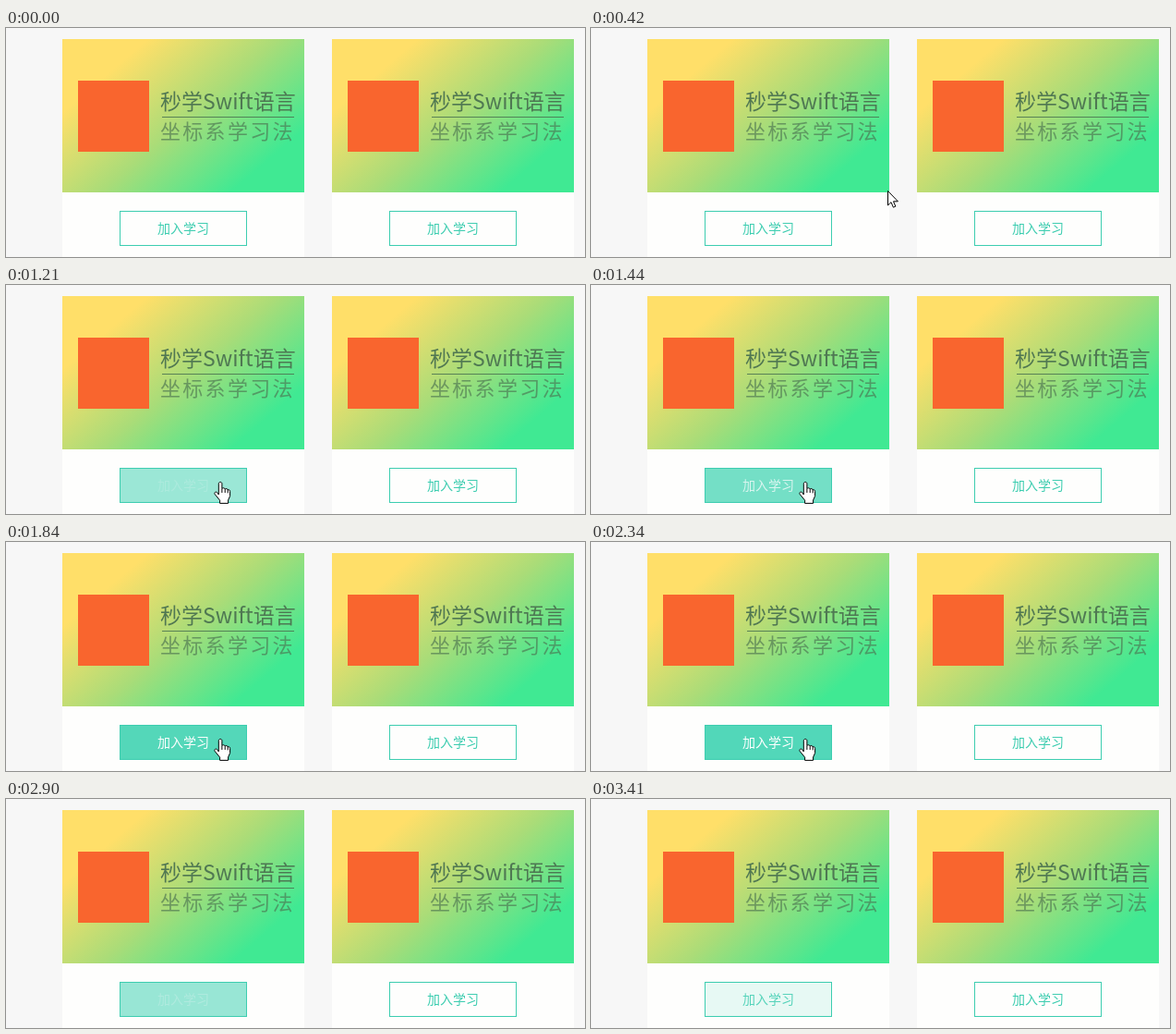
An HTML page for the animation above (3.61 s loop, 627 by 248 pixels).

```html
<!DOCTYPE html>
<html lang="zh-CN">
<head>
<meta charset="utf-8">
<title>加入学习</title>
<style>
  html, body { margin: 0; width: 100%; height: 100%; overflow: hidden; background: #f7f7f7; }
  svg { display: block; width: 627px; height: 248px; }
  text { font-family: "Noto Sans CJK SC", "Noto Sans CJK", "Noto Sans CJK JP", sans-serif; }
  .title { font-size: 23px; fill: #4b7250; fill-opacity: .95; }
  .sub { font-size: 22px; font-weight: 300; letter-spacing: 2.3px; fill: #4b7250; fill-opacity: .65; }
  .label { font-size: 14px; text-anchor: middle; fill: #3dcdb0; }
  .frame { fill: none; stroke: #3dcdb0; }
  .cursor { fill: #fff; stroke: #000; stroke-linejoin: round; }
</style>
</head>
<body>
<svg viewBox="0 0 627 248">
  <defs>
    <linearGradient id="sky" gradientUnits="userSpaceOnUse" x1="100" y1="58" x2="220" y2="198">
      <stop offset="0" stop-color="#ffdf69"/>
      <stop offset=".5" stop-color="#aadc78"/>
      <stop offset="1" stop-color="#40e993"/>
    </linearGradient>
    <g id="card">
      <rect x="61" y="12" width="262" height="236" fill="#fefefd"/>
      <rect x="61" y="12" width="262" height="166" fill="url(#sky)"/>
      <rect x="78" y="57" width="77" height="77" fill="#f9652e"/>
      <text class="title" x="167" y="88">秒学Swift语言</text>
      <path d="M169 96.5H312" stroke="#4b7250" stroke-opacity=".85"/>
      <text class="sub" x="167" y="120">坐标系学习法</text>
      <rect class="frame" x="123.5" y="198.5" width="137" height="37"/>
    </g>
  </defs>
  <use href="#card"/>
  <use href="#card" x="292"/>
  <rect id="fill" x="124" y="199" width="136" height="36" fill="#52d7b9" opacity="0"/>
  <text id="label" class="label" x="192" y="222">加入学习</text>
  <text class="label" x="484" y="222">加入学习</text>
  <g id="cursor" class="cursor" visibility="hidden">
    <path id="arrow" d="M.5 .5V16L4 12.7L6.4 18.2L8.8 17.2L6.5 11.8H11.4Z"/>
    <g id="hand" transform="translate(-7 -1)">
      <path d="M5.3 15V3.2C5.3 .8 8.9 .8 8.9 3.2V8.6C9.5 7.4 12 7.5 12.2 9.2C12.9 8.1 15 8.4 15.2 10C16.2 9.2 17.6 10 17.6 11.4V16.5L15.6 21V24.4H6.6V21.2L1.2 14.6C.2 12.6 2.2 11.3 3.6 12.7Z"/>
      <path fill="none" d="M8.9 8.6V13M12.2 9.2V13M15.2 10V13.4"/>
    </g>
  </g>
</svg>
<script>
  const LOOP = 3610, STEP = 30;
  const ARRIVE = 780, DEPART = 2340, GONE = 2650;
  const $ = id => document.getElementById(id);
  const [fill, label, cursor, arrow, hand] = ['fill', 'label', 'cursor', 'arrow', 'hand'].map($);
  const progress = (t, from, to) => Math.min(1, Math.max(0, (t - from) / (to - from)));
  const mix = (a, b, k) => a + (b - a) * k;

  // CSS "ease": cubic-bezier(.25, .1, .25, 1)
  function ease(x) {
    const curve = (u, p, q) => 3 * u * (1 - u) * ((1 - u) * p + u * q) + u * u * u;
    let lo = 0, hi = 1;
    for (let i = 0; i < 20; i++) {
      const mid = (lo + hi) / 2;
      if (curve(mid, .25, .25) < x) lo = mid; else hi = mid;
    }
    return curve(lo, .1, 1);
  }

  // swings in along a parabola, rests, then speeds off to the lower right
  function pointer(t) {
    if (t < DEPART) {
      const p = 1 - (1 - progress(t, STEP, ARRIVE)) ** 1.6;
      return [520 - 288 * p, 243 - 247 * p + 217 * p * p];
    }
    const p = progress(t, DEPART, GONE) ** 2.4;
    return [232 + 156 * p, 213 + 36 * p];
  }

  function hover(t) {
    return t < 2490
      ? Math.min(1, 1.05 * ease(progress(t, 680, 2320)))
      : 1 - ease(progress(t, 2490, 4040));
  }

  function draw(now) {
    const t = Math.floor(now % LOOP / STEP) * STEP;
    const k = hover(t);
    fill.setAttribute('opacity', k);
    label.style.fill = `rgb(${[61, 205, 176].map(c => Math.round(mix(c, 255, k)))})`;

    const [x, y] = pointer(t).map(Math.round);
    const over = x >= 123 && x < 261 && y >= 198 && y < 236;
    cursor.setAttribute('visibility', t >= STEP && t < GONE ? 'visible' : 'hidden');
    cursor.setAttribute('transform', `translate(${x} ${y})`);
    arrow.style.display = over ? 'none' : '';
    hand.style.display = over ? '' : 'none';
  }

  const start = performance.now();
  function loop() {
    draw(performance.now() - start);
    requestAnimationFrame(loop);
  }
  loop();
</script>
</body>
</html>
```
